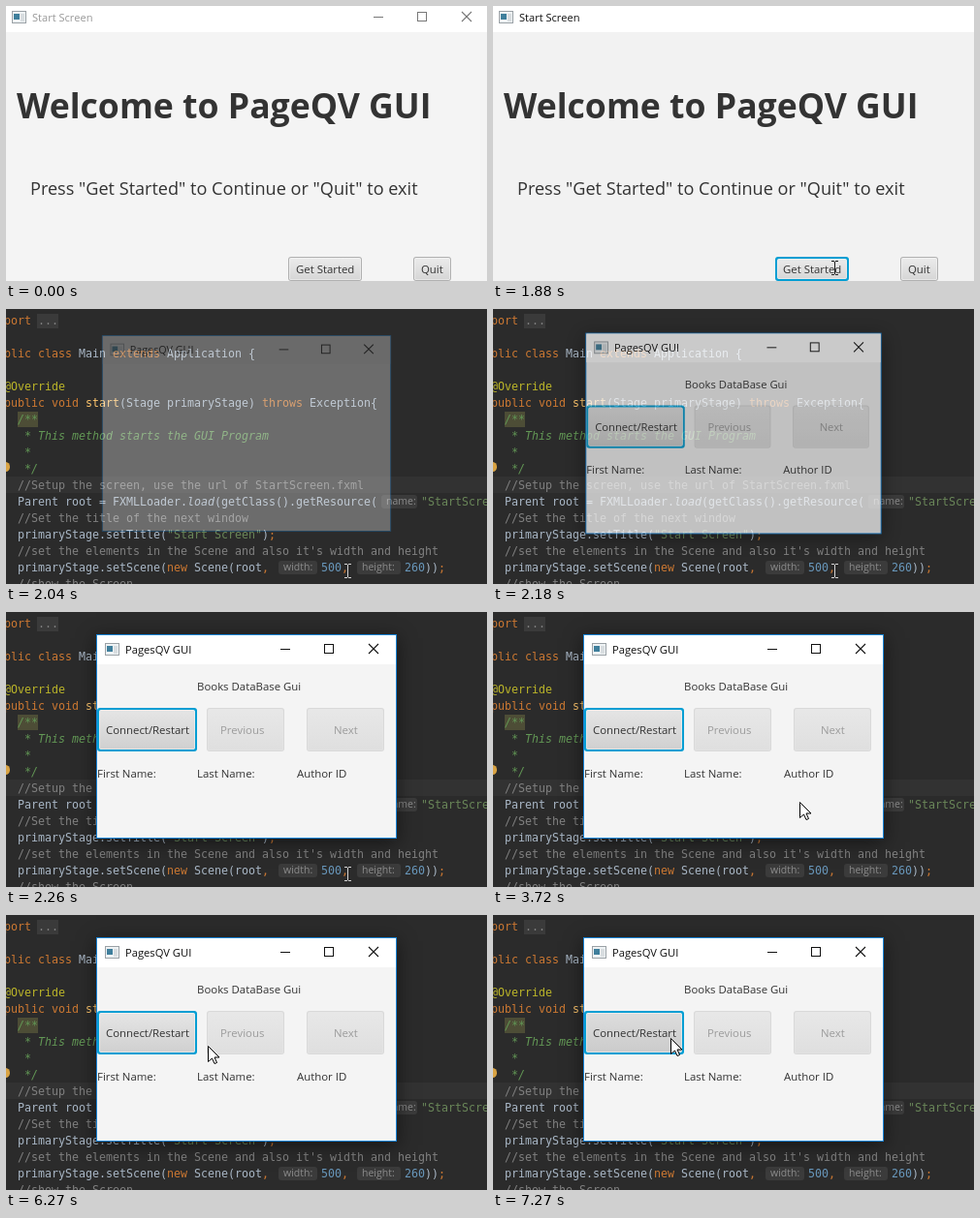
These frames come from a looping animation (496 by 284 pixels, 8000 ms). An HTML page with a canvas:

```html
<!DOCTYPE html>
<html lang="en">
<head>
<meta charset="utf-8">
<title>Desktop app start</title>
<style>
html, body { margin: 0; width: 496px; height: 284px; overflow: hidden; background: #2b2b2b; }
canvas { display: block; }
</style>
</head>
<body>
<canvas id="stage" width="496" height="284"></canvas>
<script>
const stage = document.getElementById('stage').getContext('2d');
const layer = new OffscreenCanvas(496, 284).getContext('2d');
let c = stage;
const LOOP = 8000;
const UI = '"Open Sans", "Noto Sans", sans-serif';
const MONO = '"DejaVu Sans Mono", "Liberation Mono", monospace';
const INK = '#333';

// Pointer moves: start, end, number of steps, final x, final y
const MOVES = [
  [380, 450, 2, 363, 281], [620, 770, 3, 363, 277], [940, 1010, 2, 356, 273],
  [1180, 1180, 1, 355, 273], [1330, 1480, 3, 350, 269], [1800, 1880, 2, 353, 270],
  [2490, 3260, 11, 327, 213], [3340, 3720, 6, 316, 196], [4270, 5040, 11, 256, 156],
  [5120, 5660, 8, 216, 139], [6270, 6270, 1, 208, 135], [6340, 6730, 6, 183, 127]
];

const COLORS = {
  k: '#cc7832', p: '#a9b7c6', a: '#bbb529', m: '#ffc66d',
  c: '#808080', d: '#629755', s: '#6a8759', n: '#6897bb'
};

function rect(x, y, w, h, color) {
  c.fillStyle = color;
  c.fillRect(x, y, w, h);
}

function text(str, x, y, size = 11.4, color = INK, style = '', family = UI) {
  c.font = `${style} ${size}px ${family}`;
  c.fillStyle = color;
  c.fillText(str, x, y);
  return x + c.measureText(str).width;
}

function stroke(color, width, ...points) {
  c.strokeStyle = color;
  c.lineWidth = width;
  c.beginPath();
  points.forEach(([x, y], i) => i ? c.lineTo(x, y) : c.moveTo(x, y));
  c.stroke();
}

function roundRect(x, y, w, h, r, fill) {
  c.fillStyle = fill;
  c.beginPath();
  c.roundRect(x, y, w, h, r);
  c.fill();
}

// Paints a whole window first, then fades it in one piece
function faded(alpha, paint) {
  layer.clearRect(0, 0, 496, 284);
  c = layer;
  paint();
  c = stage;
  c.globalAlpha = alpha;
  c.drawImage(layer.canvas, 0, 0);
  c.globalAlpha = 1;
}

function button(label, x, y, w, h, tx, ty, { focus, disabled, top = '#ececec', bottom = '#d5d5d5' } = {}) {
  c.save();
  if (disabled) c.globalAlpha = 0.4;
  const g = c.createLinearGradient(0, y, 0, y + h);
  g.addColorStop(0, top);
  g.addColorStop(1, bottom);
  const b = focus ? 2 : 1;
  roundRect(x, y, w, h, 3, focus ? '#039ed3' : '#b0b0b0');
  roundRect(x + b, y + b, w - 2 * b, h - 2 * b, 2, '#f6f6f6');
  roundRect(x + b + 0.5, y + b + 0.5, w - 2 * b - 1, h - 2 * b - 1, 2, g);
  text(label, tx, ty);
  c.restore();
}

function windowIcon(x, y) {
  rect(x, y, 15, 13, '#9aa1a6');
  rect(x + 1, y + 1, 13, 11, '#eef2f4');
  rect(x + 2, y + 3, 6, 6, '#3f7f9c');
  rect(x + 9, y + 3, 4, 8, '#d8dde0');
}

function windowControls(x, y, color) {
  stroke(color, 1, [x, y + 0.5], [x + 10, y + 0.5]);
  c.strokeRect(x + 45.5, y - 4.5, 9, 9);
  stroke(color, 1.1, [x + 91, y - 5], [x + 101, y + 5]);
  stroke(color, 1.1, [x + 101, y - 5], [x + 91, y + 5]);
}

function startScreen(t) {
  const active = t >= 1800;
  rect(0, 0, 496, 284, active ? '#f2f2f2' : '#f4f4f4');
  rect(0, 0, 496, 27, '#fff');
  windowIcon(6, 5);
  text('Start Screen', 27, 16, 11.1, active ? '#111' : '#999');
  if (t < 1880) windowControls(379, 11, active ? '#111' : '#777');
  text('Welcome to PageQV GUI', 11, 116, 35.6, INK, 'bold');
  text('Press "Get Started" to Continue or "Quit" to exit', 25, 195, 18.1);
  button('Get Started', 291, 259, 76, 25, 299, 276, { focus: active });
  button('Quit', 420, 259, 39, 25, 428, 276);
}

// Draws colour/text pairs one after another
function code(x, y, ...parts) {
  for (let i = 0; i < parts.length; i += 2) {
    const kind = parts[i];
    const style = kind === 'i' || kind === 'd' ? 'italic' : '';
    x = text(parts[i + 1], x, y, 11.63, COLORS[kind] || COLORS.p, style, MONO);
  }
}

function hint(label, x, y, w) {
  roundRect(x, y - 11, w, 14, 3, '#3b3b3b');
  text(label, x + 5, y - 1, 10.5, '#8c8c8c');
}

function editor() {
  rect(0, 0, 496, 284, '#2b2b2b');
  rect(0, 173, 496, 17, '#323232');
  rect(32, 5, 22, 15, '#3a3a3a');
  rect(12, 106, 21, 16, '#4d4d36');
  code(-16, 16, 'k', 'import ', 'c', '...');
  code(-16, 50, 'k', 'public class ', 'p', 'Main ', 'k', 'extends ', 'p', 'Application {');
  code(-2, 84, 'a', '@Override');
  code(-2, 101, 'k', 'public void ', 'm', 'start', 'p', '(Stage primaryStage) ', 'k', 'throws ', 'p', 'Exception{');
  code(12, 118, 'd', '/**');
  code(19, 135, 'd', '* This method starts the GUI Program');
  code(19, 152, 'd', '*');
  code(19, 169, 'd', '*/');
  roundRect(-5, 158, 9, 10, 5, '#d9a343');
  code(12, 186, 'c', '//Setup the screen, use the url of StartScreen.fxml');
  code(12, 203, 'p', 'Parent root = FXMLLoader.', 'i', 'load', 'p', '(getClass().getResource(');
  hint('name:', 387, 203, 37);
  code(428, 203, 's', '"StartScreen.fxml"');
  code(12, 220, 'c', '//Set the title of the next window');
  code(12, 237, 'p', 'primaryStage.setTitle(', 's', '"Start Screen"', 'p', ')', 'k', ';');
  code(12, 254, 'c', "//set the elements in the Scene and also it's width and height");
  code(12, 271, 'p', 'primaryStage.setScene(', 'k', 'new ', 'p', 'Scene(root', 'k', ',');
  hint('width:', 281, 271, 40);
  code(325, 271, 'n', '500', 'k', ',');
  hint('height:', 362, 271, 45);
  code(411, 271, 'n', '260', 'p', '))', 'k', ';');
  code(12, 288, 'c', '//show the Screen');
}

function dialog(t) {
  const opening = t < 2110;
  const scale = opening ? 0.962 : t < 2190 ? 0.985 : 1;
  c.save();
  c.translate(248, 128);
  c.scale(scale, scale);
  c.translate(-248, -128);
  if (!opening) {
    c.shadowColor = 'rgba(0,0,0,.5)';
    c.shadowBlur = 18;
    c.shadowOffsetY = 4;
  }
  rect(93, 23, 310, 211, '#1883d7');
  c.shadowColor = 'transparent';
  rect(94, 24, 308, 209, '#f4f4f4');
  rect(94, 24, 308, 30, opening ? '#eee' : '#fff');
  windowIcon(102, 32);
  text('PagesQV GUI', 123, 43, 11.2, '#111');
  windowControls(283, 38, '#111');
  if (!opening) {
    text('Books DataBase Gui', 197, 81);
    const shade = t >= 7190 ? { top: '#dedede', bottom: '#cacaca' }
      : t >= 6500 ? { top: '#f1f1f1', bottom: '#dcdcdc' } : { top: '#e6e6e6', bottom: '#cfcfcf' };
    button('Connect/Restart', 94, 99, 103, 45, 103, 126, { focus: true, ...shade });
    button('Previous', 207, 99, 80, 45, 221, 126, { disabled: true });
    button('Next', 310, 99, 80, 45, 338, 126, { disabled: true });
    text('First Name:', 94, 171);
    text('Last Name:', 197, 171);
    text('Author ID', 300, 171);
  }
  c.restore();
}

function pointerAt(t) {
  let x = 365, y = 290;
  for (const [start, end, steps, tx, ty] of MOVES) {
    if (t < start) break;
    const step = Math.floor((t - start) * (steps - 1) / ((end - start) || 1)) + 1;
    const f = Math.min(step, steps) / steps;
    x += (tx - x) * f;
    y += (ty - y) * f;
  }
  return [Math.round(x), Math.round(y)];
}

function arrow(x, y) {
  c.beginPath();
  [[0, 0], [0, 16], [4, 12.5], [6.5, 18], [9, 17], [6.5, 11.5], [11.5, 11.5]]
    .forEach(([dx, dy]) => c.lineTo(x + 0.5 + dx, y + 0.5 + dy));
  c.closePath();
  c.fillStyle = '#fff';
  c.fill();
  c.strokeStyle = '#000';
  c.lineWidth = 1;
  c.stroke();
}

// The text pointer inverts what lies below it
function beam(x, y) {
  c.save();
  c.globalCompositeOperation = 'difference';
  rect(x - 1, y - 6, 1, 13, '#fff');
  for (const dy of [-7, 7]) {
    rect(x - 4, y + dy, 3, 1, '#fff');
    rect(x, y + dy, 3, 1, '#fff');
  }
  c.restore();
}

function draw(t) {
  if (t < 1960) {
    startScreen(t);
  } else {
    editor();
    if (t < 2040) faded(0.4, () => startScreen(t));
    else faded(t < 2110 ? 0.32 : t < 2190 ? 0.75 : t < 2260 ? 0.95 : 1, () => dialog(t));
  }
  const [x, y] = pointerAt(t);
  if (t >= 1880 && y >= 234) beam(x, y);
  else arrow(x, y);
}

const began = performance.now();
function tick() {
  draw((performance.now() - began) % LOOP);
  requestAnimationFrame(tick);
}
tick();
</script>
</body>
</html>
```
